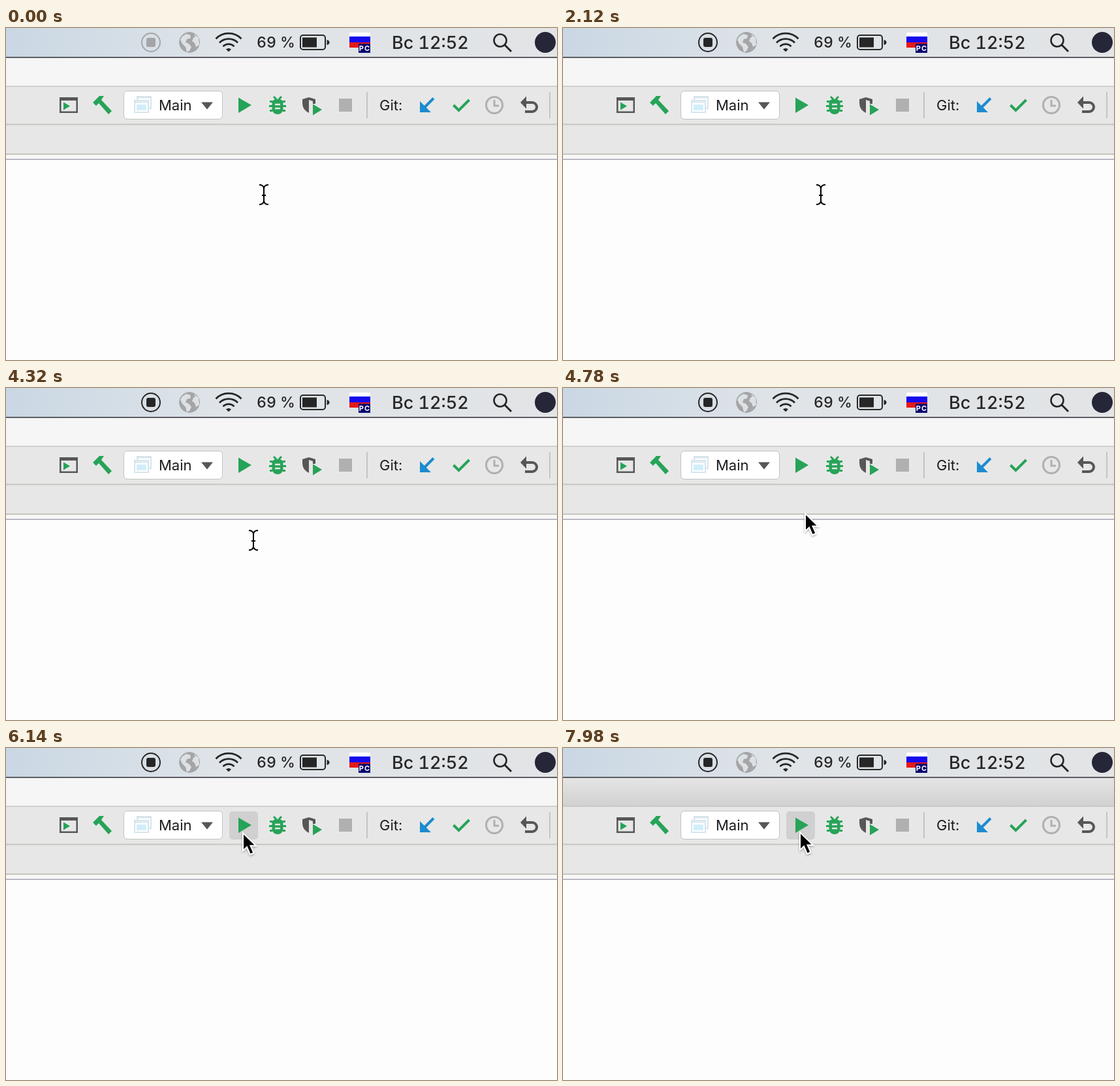
An HTML page that plays this animation: 844 by 508 pixels, repeating every 8 s.

```html
<!DOCTYPE html>
<html lang="en">
<head>
<meta charset="utf-8">
<title>Toolbar click</title>
<style>
  html, body { margin: 0; width: 100%; height: 100%; overflow: hidden; background: #fdfdfd; }
  svg { display: block; width: 844px; height: 508px; }
  text { font-family: Inter, "Open Sans", sans-serif; fill: #1c1c1c; }
  .menu { fill: #262626; font-weight: 500; font-variant-numeric: tabular-nums; }
</style>
</head>
<body>
<svg viewBox="0 0 844 508">
  <defs>
    <linearGradient id="menu">
      <stop offset="0" stop-color="#cad7e4"/>
      <stop offset=".4" stop-color="#dfe4e8"/>
      <stop offset="1" stop-color="#e2e4e6"/>
    </linearGradient>
    <linearGradient id="active" x2="0" y2="1">
      <stop offset="0" stop-color="#e5e5e5"/>
      <stop offset="1" stop-color="#d1d1d1"/>
    </linearGradient>
    <clipPath id="globe"><circle cx="281" cy="22" r="16"/></clipPath>
    <filter id="shadow" x="-50%" y="-50%" width="200%" height="200%">
      <feDropShadow dx="0" dy="1.5" stdDeviation="1.4" flood-opacity=".35"/>
    </filter>
  </defs>

  <!-- window bands -->
  <rect width="844" height="508" fill="#fdfdfd"/>
  <rect width="844" height="45" fill="url(#menu)"/>
  <rect y="46" width="844" height="43" fill="#f6f6f6"/>
  <rect id="title" y="46" width="844" height="43" fill="url(#active)"/>
  <rect y="89" width="844" height="104" fill="#e7e7e7"/>
  <rect y="194" width="844" height="6" fill="#f8f8f8"/>
  <rect y="44" width="844" height="2" fill="#5c5d63"/>
  <rect y="88.5" width="844" height="1.5" fill="#c6c6c6"/>
  <path d="M0 147.5H844M0 193H844" stroke="#c6c6c0" stroke-width="2"/>
  <path d="M0 201H844" stroke="#b8b8c6" stroke-width="2"/>

  <!-- menu bar -->
  <g id="record">
    <circle cx="222" cy="22" r="14" fill="none" stroke="currentColor" stroke-width="2"/>
    <rect x="215" y="15" width="14" height="14" rx="3" fill="currentColor"/>
  </g>
  <g clip-path="url(#globe)">
    <circle cx="281" cy="22" r="16" fill="#a3a5a7"/>
    <path d="M270 13l6-4 7 2-1 5-5 1-2 5 5 2 4 5-3 6-4 2-2-8-5-5-3-6zM288 9l7 6 1 11-5 3-2-6-4-3 2-5 3-2z" fill="#dde1e4"/>
  </g>
  <g fill="none" stroke="#262626" stroke-width="2.8">
    <path d="M321.5 16.5a27 27 0 0 1 39 0M327 22.5a19.5 19.5 0 0 1 28 0M332.5 28.2a12 12 0 0 1 17 0"/>
    <path d="M337 32.5a6 6 0 0 1 8 0l-4 4z" fill="#262626" stroke="none"/>
  </g>
  <text class="menu" x="384" y="30" font-size="23">69 %</text>
  <rect x="451" y="11" width="38" height="22" rx="4" fill="none" stroke="#262626" stroke-width="2"/>
  <path d="M454 14.5h22v15h-22zM491.5 18q4 1 4 4t-4 4z" fill="#262626"/>
  <path d="M526 7h32v6h-32z" fill="#fff"/>
  <path d="M526 13h32v9h-32z" fill="#1609ee"/>
  <path d="M526 22h32v8h-32z" fill="#e51818"/>
  <path d="M540 24h18v14h-18z" fill="#08086f"/>
  <text x="549.5" y="35" font-size="11" font-weight="700" text-anchor="middle" letter-spacing="1" style="fill:#fff">PC</text>
  <text class="menu" x="591" y="32" font-size="27">Вс 12:52</text>
  <g fill="none" stroke="#262626" stroke-width="2.6">
    <circle cx="757" cy="19" r="9.5"/>
    <path d="M764 26l10 10" stroke-width="3"/>
  </g>
  <circle cx="826" cy="22" r="16" fill="#252638"/>

  <!-- toolbar -->
  <rect id="hover" x="342" y="97" width="44" height="43" rx="5" fill="#d0d0d0"/>
  <rect x="180.5" y="96.5" width="151" height="43" rx="5.5" fill="#fff" stroke="#c2c2c2"/>
  <g fill="#575757">
    <path fill-rule="evenodd" d="M82 106h28v24h-28zM84.5 111v16.500h23v-16.500z"/>
    <path d="M299 113.5h18l-9 11z"/>
    <path d="M454 109l10-3 10 3v7h-4v-4l-6-2v20q-10-5-10-15z"/>
  </g>
  <g fill="#27a358">
    <path d="M88 113.5l10 6-10 6z"/>
    <path d="M133 114l10-10h7l-4 6 16 17-5 5-15-17-4 4z"/>
    <path d="M356 106.5l20 11.5-20 12z"/>
    <path d="M470 116.5l14 8.5-14 8.5z"/>
    <path d="M407.5 114a8.5 5.5 0 0 1 17 0v10a8.5 8 0 0 1-17 0z"/>
  </g>
  <g fill="none" stroke="#27a358" stroke-width="3">
    <path d="M404 112.5h4M424 112.5h4M403 119.5h5M424 119.5h5M404 126.5h4M424 126.5h4M410 105l4 4M422 105l-4 4"/>
    <path d="M412 117h8M412 123h8" stroke="#e7e7e7" stroke-width="2.5"/>
    <path d="M685.5 118l8 8 16-16" stroke-width="4"/>
  </g>
  <g fill="none" stroke="#d6e4ec" stroke-width="2">
    <path d="M201 110v-5h21v18h-4M201 106.5h21"/>
    <path d="M197 111h21v18h-21zM197 113.5h21"/>
    <path d="M200 117h15v9h-15z" fill="#d2eefa" stroke="none"/>
  </g>
  <text x="234" y="126" font-size="22">Main</text>
  <rect x="510" y="108" width="20" height="20" fill="#b0b0b0"/>
  <path d="M553 98v40M833 98v40" stroke="#c4c4c4" stroke-width="2"/>
  <text x="572" y="126" font-size="22">Git:</text>
  <path d="M655 107.5L640 122.5" stroke="#1c8bd0" stroke-width="4"/>
  <path d="M634 112v17h17z" fill="#1c8bd0"/>
  <g fill="none" stroke="#b0b0b0" stroke-width="3">
    <circle cx="748" cy="118" r="12.5"/>
    <path d="M748 110v9h7"/>
  </g>
  <path d="M794 114h12a6.500 6.500 0 0 1 0 14h-11" fill="none" stroke="#575757" stroke-width="4"/>
  <path d="M788 114l9-9.500v19z" fill="#575757"/>

  <!-- pointer -->
  <circle id="ring" cx="362" cy="130" r="43" fill="none" stroke="#000" stroke-width="3"/>
  <g id="beam" fill="none">
    <path d="M-7 -15q6 0 7 5q1-5 7-5M-7 15q6 0 7-5q1 5 7 5M0-11v22M-3 1h6" stroke="#fff" stroke-width="4"/>
    <path d="M-7 -15q6 0 7 5q1-5 7-5M-7 15q6 0 7-5q1 5 7 5M0-11v22M-3 1h6" stroke="#000" stroke-width="2"/>
  </g>
  <path id="arrow" d="M1 0V27l6-5.500 5 11.500 5.500-2.500-5-11h8.500z" fill="#000" stroke="#fff" stroke-width="2" filter="url(#shadow)"/>
</svg>
<script>
  const LOOP = 8000;
  const EDITOR_TOP = 201, BUTTON_BOTTOM = 140;
  const RECORD_ON = 240;
  const PRESS = 6760, RELEASE = 6940;

  // time, x, y of the pointer's hot spot
  const path = [
    [0, 395, 255], [3850, 395, 255], [4160, 386, 245], [4320, 379, 233],
    [5000, 366, 173], [5300, 363, 157], [5840, 363, 136], [6200, 362, 129],
    [LOOP, 362, 129]
  ];

  const el = id => document.getElementById(id);
  const [record, title, hover, ring, beam, arrow] =
    ["record", "title", "hover", "ring", "beam", "arrow"].map(el);
  const show = (node, on) => node.setAttribute("visibility", on ? "visible" : "hidden");

  function pointerAt(t) {
    const i = path.findIndex(p => p[0] > t);
    const a = path[i - 1], b = path[i];
    const k = (t - a[0]) / (b[0] - a[0]);
    return [1, 2].map(n => Math.round(a[n] + (b[n] - a[n]) * k));
  }

  function draw(t) {
    const [x, y] = pointerAt(t);
    const overText = y > EDITOR_TOP;
    for (const node of [beam, arrow]) node.setAttribute("transform", `translate(${x} ${y})`);
    show(beam, overText);
    show(arrow, !overText);
    record.setAttribute("color", t < RECORD_ON ? "#a3a5a7" : "#262626");
    show(hover, y < BUTTON_BOTTOM);
    show(title, t >= PRESS);
    show(ring, t >= PRESS && t < RELEASE);
  }

  const start = performance.now();
  function frame() {
    draw((performance.now() - start) % LOOP);
    requestAnimationFrame(frame);
  }
  draw(0);
  requestAnimationFrame(frame);
</script>
</body>
</html>
```
